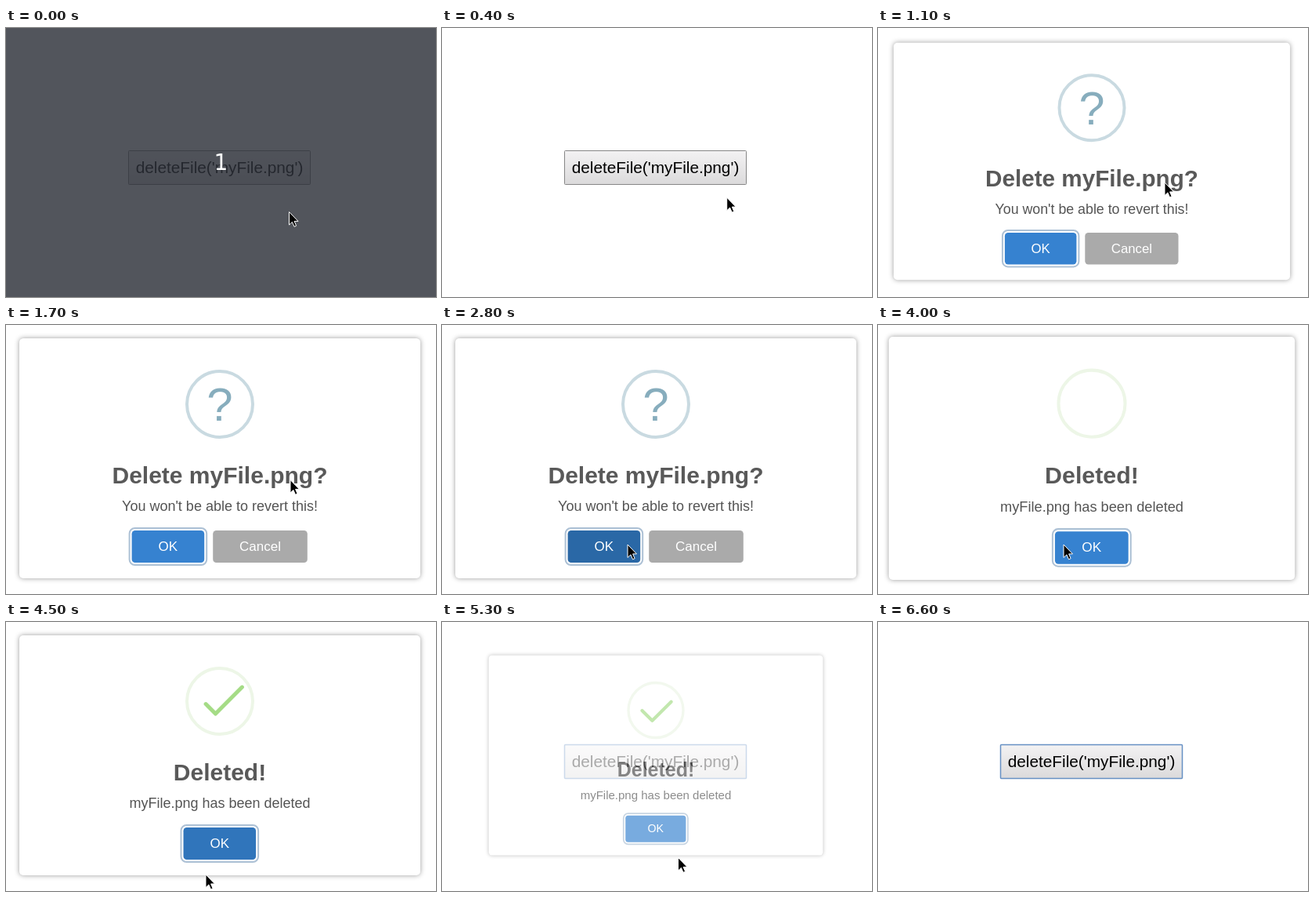
Animation, 549 px wide and 343 px high, one loop 7.4 s. Source, as an HTML page:

```html
<!DOCTYPE html>
<html lang="en">
<head>
<meta charset="utf-8">
<title>Delete dialog</title>
<style>
  html, body { margin: 0; width: 100%; height: 100%; overflow: hidden; background: #fff; }
  svg { display: block; font-family: "Liberation Sans", Arial, sans-serif; text-anchor: middle; }
  .popup { fill: #fff; filter: drop-shadow(0 0 3px rgba(0, 0, 0, .4)); }
  .count { font-family: "DejaVu Sans", sans-serif; }
</style>
</head>
<body>
<svg id="stage" width="549" height="343" viewBox="0 0 549 343"></svg>
<script>
const LOOP = 7400, STEP = 100;
const ASK = 1031, LOAD = 2900, DONE = 3920, HIDE = 5250, CLOSED = 5400;
const BLUE = '#3682d0', HOVER = '#3075bb', PRESSED = '#2a68a6';
const stage = document.getElementById('stage');

// Pointer legs: start, end, and where it comes to rest
const legs = [
  { from: 300, to: 800, x: 365.5, y: 196.5 },
  { from: 1100, to: 1200, x: 362.5, y: 197 },
  { from: 1700, to: 2600, x: 236.5, y: 279.5 },
  { from: 4000, to: 4500, x: 254.5, y: 321.5 },
  { from: 4500, to: 5000, x: 301, y: 300 },
  { from: 5700, to: 6400, x: 283, y: 298 }
];

const progress = (t, from, to) => Math.min(1, Math.max(0, (t - from) / (to - from)));
const mix = (a, b, f) => a + (b - a) * f;
const easeOut = f => 1 - (1 - f) ** 3;
const within = (t, from, to) => t >= from && t < to;

const rect = (x, y, w, h, attrs) =>
  `<rect x="${x}" y="${y}" width="${w}" height="${h}" ${attrs}/>`;

const text = (str, x, y, size, fill, attrs = '') =>
  `<text x="${x}" y="${y}" font-size="${size}" fill="${fill}" ${attrs}>${str}</text>`;

const ring = color =>
  `<circle cx="273" cy="101" r="42" fill="none" stroke="${color}" stroke-width="4"/>`;

function pageButton(focused) {
  const border = focused ? '#6690c4' : '#868686';
  return rect(156.5, 156.5, 232, 43,
      `rx="1" fill="url(#face)" stroke="${border}" stroke-width="${focused ? 1.5 : 1}"`) +
    text("deleteFile('myFile.png')", 272.5, 185, 20.8, '#000');
}

function button(label, x, w, fill) {
  return rect(x, 262, w, 41, `rx="4.25" fill="${fill}"`) +
    text(label, x + w / 2, 288, 17, '#fff');
}

const cancelButton = x => button('Cancel', x, 120.6, '#aaa');

function okButton(t, x) {
  const pressed = within(t, 2700, LOAD) || within(t, 5200, HIDE);
  const hover = within(t, 2200, 2700) || within(t, 4200, 4600) || within(t, 4900, 5200);
  return rect(x - 3, 259, 98.6, 47, 'rx="7" fill="#fff" stroke="#adc1d5" stroke-width="2"') +
    button('OK', x, 92.6, pressed ? PRESSED : hover ? HOVER : BLUE);
}

// Two opposite arcs, one turn in 1.5 s
function spinner(t) {
  const r = 25.5, d = r * Math.SQRT1_2;
  return `<path transform="translate(182.6 282) rotate(${(t - LOAD) * .24})"
    d="M${d} ${-d}A${r} ${r} 0 0 1 ${d} ${d}M${-d} ${d}A${r} ${r} 0 0 1 ${-d} ${-d}"
    fill="none" stroke="${BLUE}" stroke-width="4.25"/>`;
}

// The stroke is drawn first, then slides back a little into place
function checkMark(t) {
  const drawn = progress(t, 4230, 4450), settle = progress(t, 4450, 4580);
  if (!drawn) return '';
  const tail = mix(0, 5, settle), tip = mix(0, 8, settle);
  return `<path d="M${257 - tail} ${106.5 - tail}L267.5 117L${304.5 - tip} ${80 + tip}"
    pathLength="1" stroke-dasharray="${drawn} 2" fill="none" stroke="#a5dc86"
    stroke-width="5" stroke-linecap="round" stroke-linejoin="round"/>`;
}

const message = (title, body) =>
  text(title, 273, 202, 30, '#595959', 'font-weight="bold"') +
  text(body, 273, 237.3, 18, '#545454');

// Pops open with a damped swing around full size
const swing = age => 1 - .3 * Math.exp(-age / 70) * Math.cos(age / 47);

function popup(t) {
  if (!within(t, ASK, CLOSED)) return '';
  const done = t >= DONE, loading = t >= LOAD && !done, grow = loading ? 9 : 0;
  const hide = progress(t, HIDE, CLOSED);
  const scale = swing(t - (done ? DONE : ASK)) * mix(1, .5, hide);
  const content = done
    ? ring('#edf6e7') + checkMark(t) + message('Deleted!', 'myFile.png has been deleted')
    : ring('#c9dae1') + text('?', 273, 122, 60, '#87adbd') +
      message('Delete myFile.png?', "You won't be able to revert this!");
  const actions = done ? okButton(t, 226.5)
    : loading ? spinner(t) + cancelButton(248)
    : okButton(t, 160.6) + cancelButton(264.2);
  return `<g opacity="${1 - hide}"
    transform="translate(273 170) scale(${scale}) translate(-273 -170)">` +
    rect(17, 17 - grow, 512, 306 + 2 * grow, 'rx="5" class="popup"') +
    `<g transform="translate(0 ${-grow})">${content}</g>${actions}</g>`;
}

function countdown(t) {
  if (t >= 100) return '';
  return rect(0, 0, 549, 343, 'fill="#2d3039" opacity=".82"') +
    text('1', 274.5, 181, 28, '#fff', 'class="count"');
}

function arrow(t) {
  if (t >= 6600) return '';
  let x = 361, y = 234;
  for (const leg of legs) {
    const f = easeOut(progress(t, leg.from, leg.to));
    x = mix(x, leg.x, f);
    y = mix(y, leg.y, f);
  }
  return `<path transform="translate(${x} ${y})" fill="#000" stroke="#fff"
    d="M.5 .5V17L4.4 13.4L7 19.3L9.6 18.2L7.1 12.4H12Z"/>`;
}

const defs = `<defs><linearGradient id="face" x2="0" y2="1">
  <stop stop-color="#f3f2f3"/><stop offset="1" stop-color="#dbdadb"/></linearGradient></defs>`;

let shown = -1;
function draw(now) {
  const t = Math.floor(now % LOOP / STEP) * STEP;
  if (t === shown) return;
  shown = t;
  stage.innerHTML = defs + pageButton(t >= 800) + popup(t) + countdown(t) + arrow(t);
}

const start = performance.now();
function tick() {
  draw(performance.now() - start);
  requestAnimationFrame(tick);
}
tick();
</script>
</body>
</html>
```
